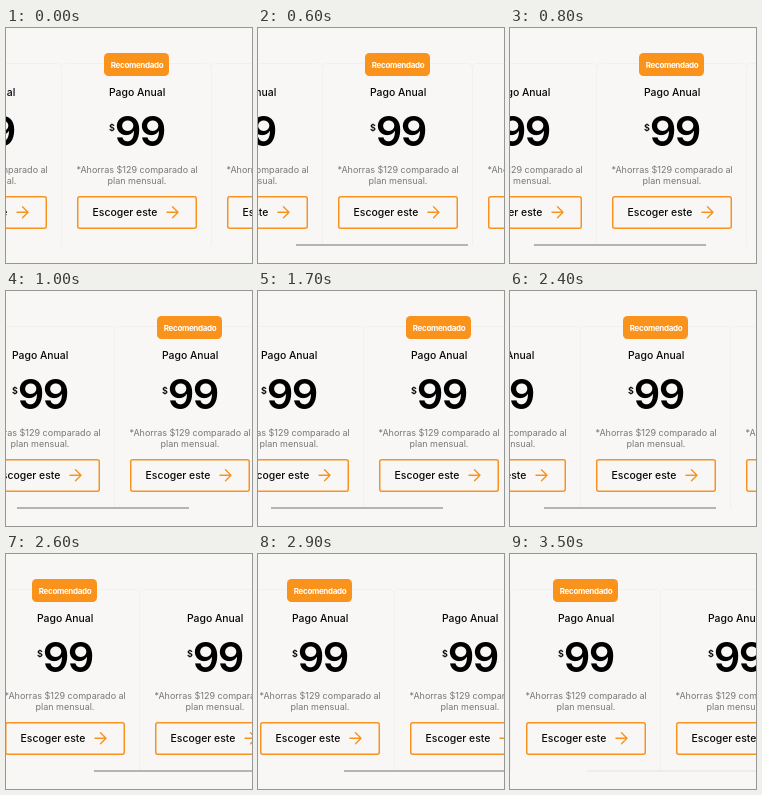
Animation of 246x235 px, one loop 4900 ms. Source, as an HTML page:

```html
<!DOCTYPE html>
<html lang="es">
<head>
<meta charset="utf-8">
<title>Planes</title>
<style>
  html, body { margin: 0; width: 100%; height: 100%; overflow: hidden; background: #f8f7f6; }
  svg { display: block; width: 246px; height: 235px; font-family: Inter, "Noto Sans", sans-serif; }
  .edge { fill: none; stroke: #f1f0ef; }
  .title, .cta { font-size: 10.4px; font-weight: 500; fill: #080808; }
  .price { font-size: 41.5px; font-weight: 600; letter-spacing: -1.5px; }
  .sign { font-size: 9px; font-weight: 600; }
  .note { font-size: 9px; fill: #777; font-feature-settings: "calt" 0; }
  .mid { text-anchor: middle; }
  .button { fill: none; stroke: #f7931e; stroke-width: 1.5; }
  .arrow { fill: none; stroke: #f7931e; stroke-width: 1.4; stroke-linecap: round; stroke-linejoin: round; }
  .badge rect { fill: #f9931c; }
  .badge text { font-size: 8px; font-weight: 700; letter-spacing: -0.35px; fill: #fff; }
</style>
</head>
<body>
<svg viewBox="0 0 246 235">
  <defs>
    <g id="card">
      <path class="edge" d="M55.5 218V39.5q0-4 4-4H201.5q4 0 4 4V218"/>
      <text class="title mid" x="131.2" y="68">Pago Anual</text>
      <text class="sign" x="103" y="103">$</text>
      <text class="price" x="108.8" y="118">99</text>
      <text class="note mid" x="131.2" y="145">*Ahorras $129 comparado al</text>
      <text class="note mid" x="131" y="156">plan mensual.</text>
      <rect class="button" x="71.75" y="168.75" width="118.5" height="31.5" rx="2"/>
      <text class="cta" x="86.6" y="188">Escoger este</text>
      <path class="arrow" d="M161 184.3H172M166.5 178.8L172 184.3L166.5 189.8"/>
    </g>
  </defs>
  <g id="track">
    <use href="#card" x="-150"/>
    <use href="#card"/>
    <use href="#card" x="150"/>
    <g class="badge">
      <rect x="98" y="25" width="65" height="23" rx="4.5"/>
      <text class="mid" x="131" y="39.5">Recomendado</text>
    </g>
  </g>
  <rect id="bar" y="216" width="172" height="2" fill="#b4b4b4"/>
</svg>
<script>
  const LOOP = 4900, TICK = 100;

  // Drags of the card row; the bar fades out at `fade`.
  const drags = [
    { start: 600, end: 1000, from: 9, to: 53, power: 1, fade: 1400 },
    { start: 1700, end: 1900, from: 50, to: 42, power: 1 },
    { start: 2200, end: 2600, from: 38, to: -72, power: 2.25 },
    { start: 2900, end: 3100, from: -69, to: -55, power: 1, fade: 3400 }
  ];

  const barLeft = shift => Math.round(11 + (53 - shift) * 0.612);

  function stateAt(time) {
    const drag = drags.findLast(d => time >= d.start);
    if (!drag) return { shift: 0, alpha: 0 };
    const { start, end, from, to, power, fade = LOOP } = drag;
    const part = Math.min(1, (time - start) / (end - start));
    const shift = Math.round(from + (to - from) * part ** power);
    const alpha = time < fade ? 1 : Math.max(0.18, 0.5 - (time - fade) / 300);
    return { shift, alpha };
  }

  function play(id, style) {
    const frames = [];
    for (let time = 0; time <= LOOP; time += TICK) {
      frames.push({ offset: time / LOOP, easing: "steps(1, end)", ...style(stateAt(time)) });
    }
    document.getElementById(id).animate(frames, { duration: LOOP, iterations: Infinity });
  }

  play("track", ({ shift }) => ({ transform: `translateX(${shift}px)` }));
  play("bar", ({ shift, alpha }) => ({
    transform: `translateX(${barLeft(shift)}px)`,
    opacity: alpha
  }));
</script>
</body>
</html>
```
